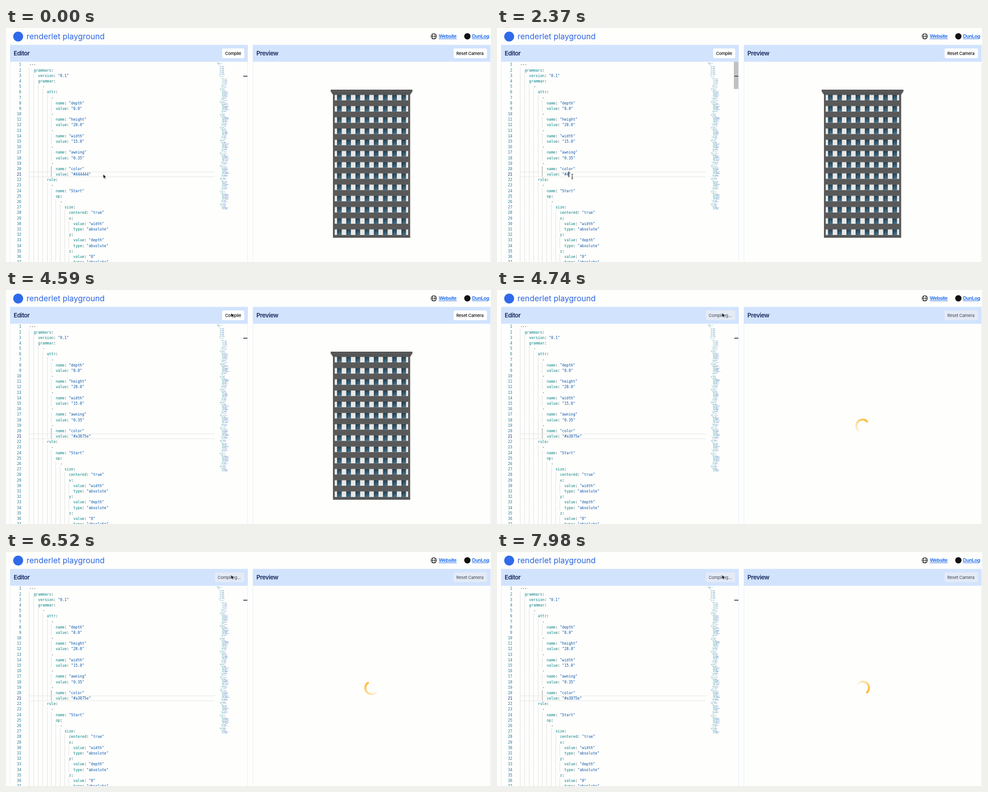
Write an HTML page with a canvas that moves like this. It is 1077x520 px and loops after 8 s.

```html
<!DOCTYPE html>
<html lang="en">
<head>
<meta charset="utf-8">
<title>Playground</title>
<style>
  html, body { margin: 0; width: 1077px; height: 520px; overflow: hidden; background: #fefefd; }
  canvas, svg { position: absolute; left: 0; top: 0; display: block; }
  text { white-space: pre; font-family: Inter, sans-serif; }
  .brand { font-size: 17.6px; fill: #2c66e3; }
  .link { font-size: 10.8px; font-weight: 600; letter-spacing: -.45px; fill: #1667ec; }
  .head { font-size: 13.5px; font-weight: 600; letter-spacing: -.5px; fill: #16295c; }
  .button { font-size: 9.48px; font-weight: 500; letter-spacing: -.25px; fill: #111; }
  .button.off { fill: #565d6b; }
  .code { font-family: "DejaVu Sans Mono", monospace; font-size: 8.124px; fill: #111; }
  .num { text-anchor: end; fill: #237893; }
  .num.active { fill: #0b216f; }
  .key { fill: #008080; }
  .value { fill: #0451a5; }
</style>
</head>
<body>
<canvas id="stage" width="1077" height="520"></canvas>
<svg width="1077" height="520" viewBox="0 0 1077 520">
  <text class="brand" x="45.5" y="25">renderlet playground</text>
  <text class="link" x="961" y="22">Website</text>
  <text class="link" x="1035" y="22">DunLog</text>
  <text class="head" x="17" y="61">Editor</text>
  <text class="head" x="556" y="61">Preview</text>
  <text class="button" id="compile" y="59.8"></text>
  <text class="button" id="reset" x="1000" y="59.8">Reset Camera</text>
  <g id="code"></g>
  <path id="arrow" d="M0 0V9.2L2.1 7.3L3.6 10.7L5.2 10L3.7 6.8H6.6Z" fill="#000" stroke="#fff" stroke-width=".7"/>
  <path id="beam" d="M-2 -5.5Q0 -5.5 0 -4Q0 -5.5 2 -5.5M0 -4V4M-2 5.5Q0 5.5 0 4Q0 5.5 2 5.5M-1.2 1.8H1.2" fill="none" stroke="#222" stroke-width="1"/>
</svg>
<script>
const LOOP = 8000, TICK = 147.8;
const CHAR = 4.891, LINE = 12.186, LEFT = 51.7, TOP = 75.4;
const ACTIVE = 21, COMPILED = 32;
const ctx = document.getElementById("stage").getContext("2d");
const byId = id => document.getElementById(id);

const attr = (name, value) => [[10, "-"], [12, "name", name], [12, "value", value]];
const axis = (name, value) => [[18, name, ""], [20, "value", value], [20, "type", "absolute"]];
const lines = [
  [0, "---"], [2, "grammars", ""], [4, "version", "0.1"], [4, "grammar", ""], [6, "-"], [8, "attr", ""],
  ...attr("depth", "8.0"), ...attr("height", "28.0"), ...attr("width", "15.0"),
  ...attr("awning", "0.35"), ...attr("color", "#444444"),
  [8, "rule", ""], [10, "-"], [12, "name", "Start"], [12, "op", ""], [14, "-"], [16, "size", ""],
  [18, "centered", "true"], ...axis("x", "width"), ...axis("y", "depth"), ...axis("z", "0")
];

byId("code").innerHTML = lines.map(([indent, key, value], i) => {
  const y = TOP + i * LINE + 9, active = i + 1 === ACTIVE;
  const body = value === undefined ? key
    : `<tspan class="key">${key}</tspan>:` + (value && ` <tspan class="value"${active ? ' id="color"' : ""}>"${value}"</tspan>`);
  return `<text class="code num${active ? " active" : ""}" x="34" y="${y}">${i + 1}</text>` +
    `<text class="code" x="${LEFT + indent * CHAR}" y="${y}">${body}</text>`;
}).join("");

function rect(color, x, y, w, h) {
  ctx.fillStyle = color;
  ctx.fillRect(x, y, w, h);
}

function shape(color, build) {
  ctx.fillStyle = color;
  ctx.beginPath();
  build();
  ctx.fill();
}

function header() {
  shape("#2f6aea", () => ctx.arc(27, 19, 11, 0, 7));
  shape("#111", () => ctx.arc(1024.5, 18.5, 7, 0, 7));
  ctx.strokeStyle = "#111";
  ctx.lineWidth = 1.1;
  ctx.beginPath();
  ctx.arc(950, 18.5, 6, 0, 7);
  ctx.moveTo(952.7, 18.5);
  ctx.ellipse(950, 18.5, 2.7, 6, 0, 0, 7);
  ctx.moveTo(944, 18.5);
  ctx.lineTo(956, 18.5);
  ctx.stroke();
  rect("#1667ec", 961, 23.5, 40, 1);
  rect("#1667ec", 1035, 23.5, 35, 1);
}

function panel(x) {
  rect("#d2e3fe", x, 37.5, 528, 37.5);
  rect("#e6eefb", x, 75, 1, 445);
  rect("#e6eefb", x + 527, 75, 1, 445);
}

function button(x, right, disabled) {
  shape(disabled ? "#e5ebf6" : "#fff", () => ctx.roundRect(x, 45.5, right - x, 21.5, 3));
}

function guides() {
  lines.forEach(([indent], i) => {
    for (let col = 0; col < indent; col += 2) {
      const lit = col === 10 && (i === ACTIVE - 1 || i === ACTIVE - 2);
      rect(lit ? "#8c8c8c" : "#dcdedd", Math.round(LEFT + col * CHAR - .3), TOP + i * LINE, 1, LINE);
    }
  });
  const y = TOP + (ACTIVE - 1) * LINE;
  rect("#e9e9e8", LEFT, y, 412, 1.3);
  rect("#e9e9e8", LEFT, y + LINE - 1.3, 412, 1.3);
}

function minimap() {
  const rules = [10, 12, 12, 14, 16, 18, 18, 20, 20, 18, 20, 20, 18, 20, 20, 14, 16, 18, 18, 14, 16];
  let seed = 11;
  const random = () => (seed = seed * 16807 % 2147483647) / 2147483647;
  for (let i = 0; i < 242; i++) {
    const known = lines[i];
    const indent = known ? known[0] : rules[(i - 22) % rules.length];
    const dash = known ? known[1].startsWith("-") : indent === 10 || indent === 14;
    const key = dash ? 1 : known ? known[1].length : 4 + Math.floor(random() * 4);
    const value = dash ? 0 : known ? known[2].length : Math.floor(random() * 13);
    const x = 467 + indent * .677, y = 75.6 + i * 1.354;
    rect("rgba(0,128,128,.48)", x, y, key * .677, .8);
    if (value) rect("rgba(4,81,165,.48)", x + (key + 2) * .677, y, (value + 2) * .677, .8);
  }
}

function scrollbars(tick) {
  rect("#2b2b2b", 527, 106.3, 9, 1.7);
  if (tick < 2 || tick > 28) return;
  const hover = tick >= 26;
  if (hover) rect("rgba(100,100,100,.15)", 463.5, 75, 62.5, 49.5);
  rect(`rgba(100,100,100,${hover ? .7 : .4})`, 526, 75, 10, 60.5);
}

function building() {
  rect("#595959", 726, 147, 171.5, 319);
  rect("#505050", 726, 464.5, 171.5, 1.5);
  for (let floor = 0; floor < 13; floor++) {
    const y = 148.3 + floor * 24.92, h = 12.6;
    rect("#e7e7e5", 730, y, 163, h);
    const glass = ctx.createLinearGradient(0, y, 0, y + h);
    glass.addColorStop(0, "#263f4f");
    glass.addColorStop(1, "#47728b");
    for (let i = 0; i < 8; i++) {
      const x = 735.3 + i * 20.4;
      rect(glass, x, y, 10.2, h);
      rect("rgba(20,40,54,.3)", x, y, 3, h);
    }
    rect("rgba(60,60,60,.35)", 730, y, 163, 1);
  }
  shape("#555", () => {
    ctx.moveTo(721, 137);
    ctx.lineTo(902.5, 137);
    ctx.lineTo(902.5, 141);
    ctx.lineTo(897.5, 148.3);
    ctx.lineTo(726, 148.3);
    ctx.lineTo(721, 141);
  });
  rect("#626262", 721, 140.5, 181.5, 1);
}

function spinner(tick) {
  const head = (tick * 148 * .36 + 50) * Math.PI / 180, span = 3.65;
  const fade = ctx.createConicGradient(head - span, 812, 302);
  fade.addColorStop(0, "rgba(253,190,70,0)");
  fade.addColorStop(.5, "rgba(253,190,70,1)");
  fade.addColorStop(.8, "rgba(253,190,70,1)");
  fade.addColorStop(.85, "rgba(253,190,70,0)");
  ctx.strokeStyle = fade;
  ctx.lineWidth = 4.6;
  ctx.lineCap = "round";
  ctx.beginPath();
  ctx.arc(812, 302, 14, head - span, head);
  ctx.stroke();
}

// One digit is erased per keystroke, then the new colour is pasted.
function colorAt(tick) {
  if (tick >= 20) return "#a3875e";
  const erased = tick < 11 ? 0 : tick < 15 ? tick - 10 : tick < 16 ? 4 : tick < 17 ? 5 : 6;
  return "#" + "4".repeat(6 - erased);
}

function caretOn(tick) {
  return tick >= 5 && tick < 9 || tick >= 11 && tick < 21 || tick >= 24 && tick < 27;
}

// [tick, x, y]
const path = [[1, 216, 325], [3, 205, 327], [5, 186, 327], [7, 167, 330], [23, 167, 330], [27, 550, 87], [31, 500, 51]];

function pointer(tick) {
  const next = path.findIndex(p => p[0] >= tick);
  if (next < 0) return path[path.length - 1].slice(1);
  const b = path[next], a = path[Math.max(0, next - 1)];
  const f = a === b ? 1 : (tick - a[0]) / (b[0] - a[0]);
  return [a[1] + (b[1] - a[1]) * f, a[2] + (b[2] - a[2]) * f];
}

function draw(tick) {
  const busy = tick >= COMPILED, color = colorAt(tick);
  rect("#fefefd", 0, 0, 1077, 520);
  header();
  panel(9);
  panel(548);
  button(busy ? 464 : 480, 529, busy);
  button(994, 1068, busy);
  guides();
  minimap();
  scrollbars(tick);
  if (busy) spinner(tick);
  else building();
  if (caretOn(tick)) {
    rect("#000", LEFT + (20 + color.length) * CHAR - .5, TOP + (ACTIVE - 1) * LINE, 1.4, LINE);
  }

  byId("color").textContent = `"${color}"`;
  byId("compile").textContent = busy ? "Compiling..." : "Compile";
  byId("compile").setAttribute("x", busy ? 470 : 486.5);
  byId("compile").classList.toggle("off", busy);
  byId("reset").classList.toggle("off", busy);

  const beam = tick >= 2 && tick < 26;
  const place = `translate(${pointer(tick).join(" ")})`;
  byId("arrow").setAttribute("visibility", beam ? "hidden" : "visible");
  byId("beam").setAttribute("visibility", beam ? "visible" : "hidden");
  byId("arrow").setAttribute("transform", place);
  byId("beam").setAttribute("transform", place);
}

let shown = -1;
function frame() {
  const tick = Math.floor((performance.now() % LOOP + 5) / TICK);
  if (tick !== shown) draw(shown = tick);
  requestAnimationFrame(frame);
}
frame();
</script>
</body>
</html>
```
